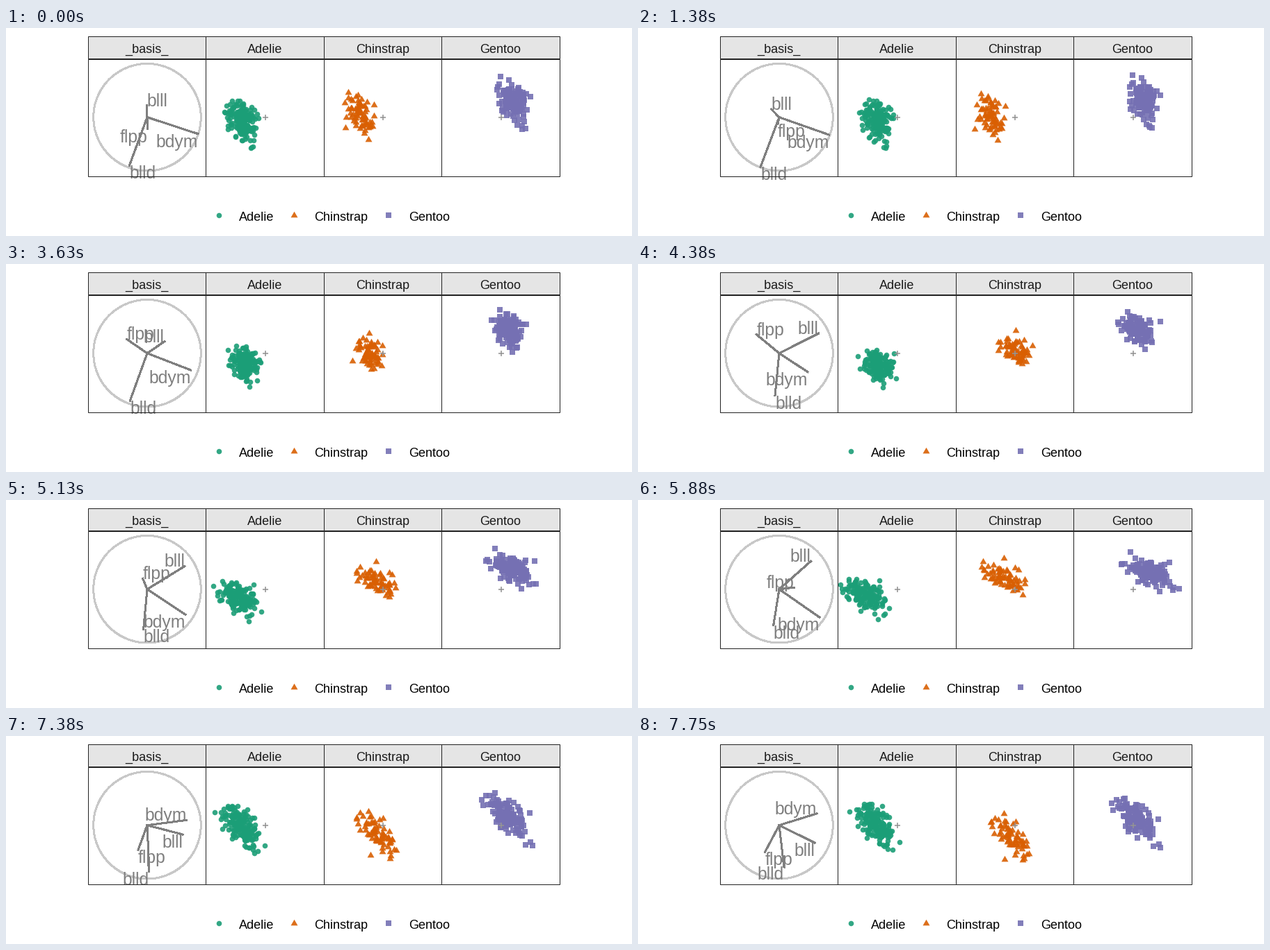
These frames come from a looping animation (900x300 px, 8 s). A matplotlib script:

```python
import numpy as np
import matplotlib.pyplot as plt
from matplotlib.animation import FuncAnimation
from matplotlib.patches import Circle, Rectangle

WIDTH, HEIGHT, DPI = 900, 300, 100
PT = 72 / DPI
FRAMES, INTERVAL = 64, 125
HOLD, TICKS_PER_STEP = 11, 3

LEFT, PANEL, TOP, SPLIT, BOTTOM = 117.5, 169.5, 11.5, 43.5, 213.5
CX, CY, RADIUS = 203, 128.7, 77.3
GREY = "#7f7f7f"

plt.rcParams["font.family"] = "Liberation Sans"

# Tour targets: step -> horizontal and vertical weight of each variable.
VARIABLES = ["blll", "blld", "flpp", "bdym"]
TARGETS = {
    0: [(-.01, -.33, .01, .94), (.22, -.90, -.22, -.31)],
    4: [(-.53, -.31, -.125, .77), (-.08, -.90, .18, -.39)],
    9: [(.72, -.07, -.42, .525), (.36, -.78, .35, -.35)],
    13: [(.58, -.10, .28, .745), (.51, -.66, .03, -.52)],
    18: [(.655, .085, -.265, .695), (-.325, -.77, -.50, .22)],
}

# Centre of each cloud in the four variables, in pixels from the cross.
SPECIES = {
    "Adelie": dict(color="#1b9e77", marker="o", size=7.6, birds=151,
                   centre=(-26, 14.5, -21, -30), shared=.45),
    "Chinstrap": dict(color="#d95f02", marker=(3, 0, 0), size=11.5, birds=68,
                      centre=(18, 13, -10, -30.5), shared=.57),
    "Gentoo": dict(color="#7570b3", marker="s", size=8, birds=123,
                   centre=(13, -30, 25, 8.5), shared=.6),
}
SPREAD = np.array([11, 13.3, 11.5, 12.5])


def basis(step):
    """Orthonormal 2x4 projection on the way between two targets."""
    table = np.array([np.ravel(t) for t in TARGETS.values()])
    raw = [np.interp(step, list(TARGETS), column) for column in table.T]
    u, _, vt = np.linalg.svd(np.reshape(raw, (2, 4)), full_matrices=False)
    return u @ vt


def cloud(spec, rng):
    """Birds whose four measures share a common body-size factor."""
    n, shared = spec["birds"], spec["shared"]
    body, own = rng.standard_normal((n, 1)), rng.standard_normal((n, 4))
    z = np.sqrt(shared) * body + np.sqrt(1 - shared) * own
    z = np.clip((z - z.mean(0)) / z.std(0), -2.4, 2.4)
    z[0, 0] = 3  # one bird with a very long bill
    return spec["centre"] + z * SPREAD


fig = plt.figure(figsize=(WIDTH / DPI, HEIGHT / DPI), dpi=DPI, facecolor="white")
ax = fig.add_axes([0, 0, 1, 1])
ax.set_xlim(0, WIDTH)
ax.set_ylim(HEIGHT, 0)
ax.axis("off")


def text(x, y, s, size=18, **kw):
    return ax.text(x, y, s, fontsize=size * PT, va="baseline", **kw)


def markers(spec, x, y):
    return ax.plot(x, y, ls="none", marker=spec["marker"],
                   ms=spec["size"] * PT, mew=0, color=spec["color"],
                   alpha=.9, zorder=3, antialiased=False)[0]


def box(x, y0, y1, **kw):
    ax.add_patch(Rectangle((x, y0), PANEL, y1 - y0, lw=PT, ec="#222222",
                           zorder=5, **kw))


for k, title in enumerate(["_basis_", *SPECIES]):
    x = LEFT + k * PANEL
    box(x, TOP, SPLIT, fc="#e5e5e5")
    box(x, SPLIT + 1, BOTTOM, fc="none")
    text(x + PANEL / 2, 35.8, title, ha="center", color="#1a1a1a", zorder=6)

ax.add_patch(Circle((CX, CY), RADIUS, fc="none", ec="#c8c8c8", lw=2 * PT,
                    antialiased=False))

rng = np.random.default_rng(7)
clouds = []
legend_x = [306, 414, 550]
for k, (name, spec) in enumerate(SPECIES.items()):
    markers(spec, [legend_x[k]], [270])
    text(legend_x[k] + 28.8, 278, name, color="black")
    cross = CX + (k + 1) * PANEL
    ax.plot([cross], [CY], marker="+", ms=8 * PT, mew=1.6 * PT,
            color="#949494", zorder=4, antialiased=False)
    clouds.append((cross, cloud(spec, rng), markers(spec, [], [])))

arrows = [ax.plot([], [], color=GREY, lw=2 * PT, zorder=2,
                  antialiased=False)[0] for _ in VARIABLES]
labels = [text(0, 0, v, size=24.8, color=GREY, zorder=3) for v in VARIABLES]


def update(i):
    step = max(0, (i - HOLD) // TICKS_PER_STEP + 1)
    projection = basis(step)
    for (dx, dy), arrow, label in zip(projection.T, arrows, labels):
        x, y = CX + RADIUS * dx, CY - RADIUS * dy
        arrow.set_data([CX, x], [CY, y])
        label.set_position((x, y + (1 if dy > 0 else 19)))
        label.set_ha("right" if dx > 0 else "left")
    for cross, birds, dots in clouds:
        px, py = projection @ birds.T
        dots.set_data(cross + px, CY - py)
    return [*arrows, *labels, *(dots for _, _, dots in clouds)]


anim = FuncAnimation(fig, update, frames=FRAMES, interval=INTERVAL,
                     repeat=True, repeat_delay=0)
plt.show()
```
